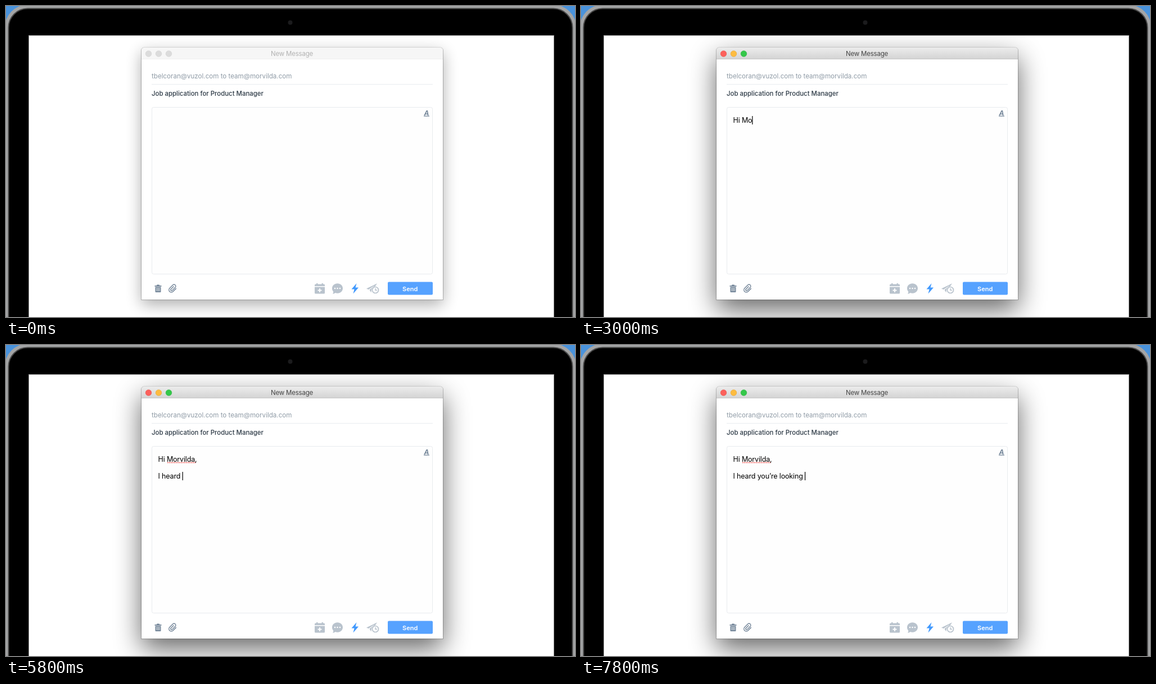
Recreate the animation shown at these times as an HTML page. Size 1012x554 px, loop 8 s.

```html
<!DOCTYPE html>
<html lang="en">
<head>
<meta charset="utf-8">
<title>New Message</title>
<style>
  html, body { margin: 0; width: 100%; height: 100%; overflow: hidden; background: #4a93dc; }
  svg { display: block; width: 1012px; height: 554px; }
  text { font-family: Inter, sans-serif; white-space: pre; }
  .body { font-size: 12.5px; letter-spacing: -.15px; fill: #000; }
  .title { font-size: 11.5px; letter-spacing: -.2px; fill: #444; text-anchor: middle; }
  .shadow { fill: #000; opacity: .6; filter: blur(24px); }
  .edge { fill: none; stroke: #000; stroke-opacity: .22; }
  .slate { fill: #75879a; }
  .pale { fill: #b9c3cd; }
  .idle .shadow { opacity: .32; filter: blur(14px); transform: translateY(-9px); }
  .idle .title { fill: #b2b2b2; }
  .idle .bar { fill: #f6f6f6; }
  .idle .rule { stroke: #f0f0f0; }
  .idle .dot { fill: #dcdcdc; stroke: #d0d0d0; }
</style>
</head>
<body>
<svg viewBox="0 0 1012 554">
  <defs>
    <linearGradient id="bar" x2="0" y2="1">
      <stop stop-color="#ececec"/><stop offset="1" stop-color="#d3d3d3"/>
    </linearGradient>
    <clipPath id="screen"><path d="M41 53H974V554H41Z"/></clipPath>
  </defs>

  <!-- laptop -->
  <rect x="-2" y="-2" width="1016" height="640" rx="40" fill="#a4a5a6"/>
  <rect x="4.5" y="4.5" width="1003" height="640" rx="34" stroke="#4b4b4b" stroke-width="2"/>
  <circle cx="505.5" cy="29.5" r="4" fill="#1b1b1d"/>
  <path d="M40 52H975V554H40Z" fill="#8a8a8a"/>
  <path d="M41 53H974V554H41Z" fill="#fff"/>

  <g id="win" class="idle" clip-path="url(#screen)">
    <rect class="shadow" x="241" y="92" width="536" height="449"/>
    <path class="edge" d="M240.500 523.500V79a5 5 0 0 1 5-5H772.500a5 5 0 0 1 5 5V523.500Z"/>
    <path d="M241 523V90H777V523Z" fill="#fff"/>
    <path class="bar" d="M241 95V79a5 5 0 0 1 5-5H772a5 5 0 0 1 5 5V95Z" fill="url(#bar)"/>
    <path class="rule" d="M241 94.500H777" stroke="#c6c6c6"/>
    <circle class="dot" cx="253.500" cy="85" r="5.300" fill="#fc605b" stroke="#e5514c" stroke-width=".6"/>
    <circle class="dot" cx="271.500" cy="85" r="5.300" fill="#fdbc40" stroke="#e2a336" stroke-width=".6"/>
    <circle class="dot" cx="289.500" cy="85" r="5.300" fill="#34c84a" stroke="#2bb03f" stroke-width=".6"/>
    <text class="title" x="508.500" y="89">New Message</text>

    <text x="259" y="129" font-size="11.6" fill="#8f9ba6">tbelcoran@vuzol.com to team@morvilda.com</text>
    <path d="M259 139.500H759" stroke="#e9ecef"/>
    <text x="259" y="160" font-size="11.4" font-weight="500" fill="#2d3a46">Job application for Product Manager</text>
    <rect x="259.500" y="180.500" width="499" height="297" rx="3" fill="#fefefe" stroke="#e8ebee"/>
    <text class="slate" x="743.500" y="194.500" font-size="12" font-weight="700" font-style="italic">A</text>
    <path class="slate" d="M743 195.500h10v1.300h-10z"/>

    <path id="squiggle" d="M288 209.500H338" stroke="#f0504c" stroke-width="1.900" stroke-linecap="round" stroke-dasharray="0 3"/>
    <text id="hi" class="body" x="270.500" y="208"></text>
    <text id="line" class="body" x="270.500" y="238"></text>
    <rect id="caret" width="1.200" height="15" fill="#000"/>

    <!-- trash and paperclip -->
    <path class="slate" d="M264.500 498h3.500v-1.500h5V498h3.500v1.700h-12zM265.500 500.500h10V509a1 1 0 0 1-1 1h-8a1 1 0 0 1-1-1z"/>
    <path d="M268 502v6M270.500 502v6M273 502v6" stroke="#fff" stroke-width=".9"/>
    <path transform="translate(297 503) rotate(45)" fill="none" stroke="#75879a" stroke-width="1.500" stroke-linecap="round"
      d="M-1.600-3V3.600a1.600 1.600 0 0 0 3.200 0V-4a3 3 0 0 0-6 0V4a4.200 4.200 0 0 0 8.400 0V-3.500"/>

    <!-- calendar -->
    <path class="pale" d="M549 499v-2q0-1.500 1.500-1.500H552V494h2.500v1.500h7V494h2.500v1.500h1.500q1.500 0 1.500 1.500v2zM549 500.500h18V511q0 1.500-1.500 1.500h-15q-1.500 0-1.500-1.500z"/>
    <path d="M558 503v7M554.500 506.500h7" stroke="#fff" stroke-width="1.800"/>

    <!-- chat bubble -->
    <path class="pale" d="M589.500 494.300c5.300 0 9.500 3.900 9.500 8.700s-4.200 8.700-9.500 8.700c-1.400 0-2.600-.2-3.800-.7q-1.800 1.500-4.700 1.700 1.300-1.700 1.300-3.800c-1.500-1.600-2.300-3.600-2.300-5.900 0-4.800 4.200-8.700 9.500-8.700z"/>
    <path d="M585 503h.01M589.500 503h.01M594 503h.01" stroke="#fff" stroke-width="2.600" stroke-linecap="round"/>

    <!-- bolt -->
    <path d="M623.500 494L614.500 504.500H619.500L617.500 512.500L627 501.500H621.500Z" fill="#4199fd"/>

    <!-- paper plane with clock -->
    <path class="pale" d="M641 503.500L660 494.300L656.500 499.500Q651.500 500 650 505L649.500 510.500L646.500 505.700L656 497L645 505Z"/>
    <circle cx="657" cy="506" r="5.500" fill="#fff" stroke="#b9c3cd" stroke-width="1.700"/>
    <path d="M657 502.800V506.300H660" fill="none" stroke="#b9c3cd" stroke-width="1.400"/>

    <rect x="679" y="491.500" width="80" height="23" rx="2" fill="#56a2ff"/>
    <text x="718.700" y="507.500" font-size="11" font-weight="600" fill="#fff" text-anchor="middle">Send</text>
  </g>
</svg>
<script>
  const LOOP = 8000, FOCUS = 1400, NEWLINE = 4000, SPELLCHECK = 4200;
  const $ = id => document.getElementById(id);
  const win = $('win'), caret = $('caret'), squiggle = $('squiggle');

  // keys: [time in ms, characters typed so far]
  const greeting = {
    el: $('hi'), text: 'Hi Morvilda,', top: 196,
    keys: [[2000, 1], [2400, 3], [2800, 4], [3000, 5], [3200, 6], [3400, 8], [3600, 9], [3800, 11], [4000, 12]]
  };
  const sentence = {
    el: $('line'), text: 'I heard you’re looking ', top: 226,
    keys: [[4800, 2], [5000, 3], [5200, 4], [5400, 5], [5600, 6], [5800, 8],
           [6000, 9], [6200, 10], [6400, 11], [6600, 13], [6800, 15], [7000, 17],
           [7200, 18], [7400, 19], [7600, 21], [7800, 23]]
  };

  function type({ el, text, keys }, t) {
    const count = keys.reduce((n, [at, chars]) => t >= at ? chars : n, 0);
    const typed = text.slice(0, count);
    if (el.textContent !== typed) el.textContent = typed;
  }

  function draw() {
    const t = performance.now() % LOOP;
    const active = t >= FOCUS;
    win.classList.toggle('idle', !active);
    type(greeting, t);
    type(sentence, t);
    const { el, top } = t < NEWLINE ? greeting : sentence;
    caret.setAttribute('x', 270.4 + (el.textContent ? el.getComputedTextLength() : 0));
    caret.setAttribute('y', top);
    caret.style.display = active ? '' : 'none';
    squiggle.style.display = t >= SPELLCHECK ? '' : 'none';
    requestAnimationFrame(draw);
  }
  draw();
</script>
</body>
</html>
```
